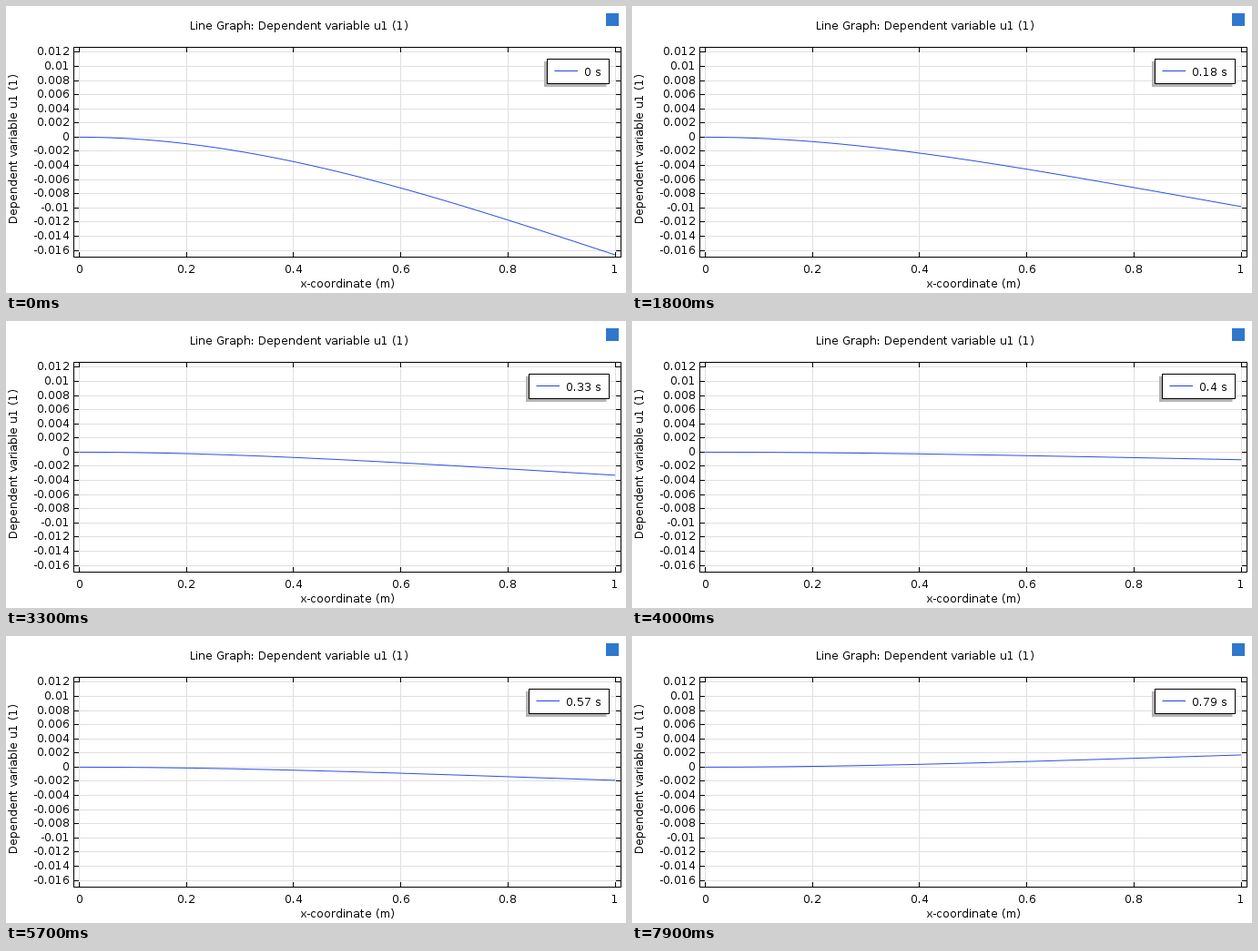
A matplotlib script that plays this animation: 681 by 316 pixels, repeating every 8 s.

```python
import numpy as np
import matplotlib.pyplot as plt
from matplotlib.animation import FuncAnimation
from matplotlib.patches import Rectangle

W, H, DPI = 681, 316, 64
PX = 72 / DPI                      # points per pixel
FRAMES, STEP_MS = 80, 100
BLUE = "#2a50ec"
GRID = "#e0e0e0"

# Unscaled hinting gives whole-pixel glyph advances
plt.rcParams.update({
    "font.family": "DejaVu Sans",
    "font.size": 12 * PX,
    "text.hinting": "native",
    "text.hinting_factor": 1,
    "text.kerning_factor": 6,
    "toolbar": "None",
})

fig = plt.figure(figsize=(W / DPI, H / DPI), dpi=DPI, facecolor="white")
ax = fig.add_axes([0, 0, 1, 1])
ax.set_xlim(0, W)
ax.set_ylim(H, 0)
ax.axis("off")

LEFT, RIGHT, TOP, BOTTOM = 74.5, 675.5, 45.5, 276.5


def px_x(x):
    return 80.5 + 588.5 * x


def px_y(u):
    return 144.4 - 7790 * u


def center(v):
    """Middle of the pixel that holds v."""
    return np.floor(v) + 0.5


def advance(text):
    """Pixel width of a number: narrow point and minus, wide digits."""
    return sum(4 if c in ".-" else 8 for c in text)


def line(xs, ys, color="black", z=2):
    return ax.plot(xs, ys, color=color, lw=PX, zorder=z, snap=False,
                   solid_capstyle="butt")[0]


def label(x, y, text, **kw):
    return ax.text(x, y, text, ha="left", va="baseline", **kw)


def box(x, y, w, h, face, edge="none", z=5):
    return ax.add_patch(Rectangle((x, y), w, h, fc=face, ec=edge, lw=PX,
                                  zorder=z, snap=False))


# Grid, ticks and tick labels
for k in range(6):
    x, text = px_x(k / 5), f"{k / 5:g}"
    c = center(x)
    line([c, c], [TOP, BOTTOM], GRID, 1)
    line([c, c], [TOP, TOP + 5.5])
    line([c, c], [BOTTOM - 5.5, BOTTOM])
    label(np.floor(x - advance(text) / 2 + 0.5), 294, text)
for k in range(-8, 7):
    u = round(k * 0.002, 3)
    c, text = center(px_y(u)), f"{u:g}"
    line([LEFT, RIGHT], [c, c], GRID, 1)
    line([LEFT, LEFT + 5.5], [c, c])
    line([RIGHT - 5.5, RIGHT], [c, c])
    label(70 - advance(text), c + 3.5, text)
box(LEFT, TOP, RIGHT - LEFT, BOTTOM - TOP, "none", "black", 3)

label(202, 26, "Line Graph: Dependent variable u1 (1)")
label(324, 310, "x-coordinate (m)")
label(13, 239, "Dependent variable u1 (1)", rotation=90, rotation_mode="anchor")
box(659, 8, 14, 14, "#2f78cc")

# Beam shapes, scaled to 1 at the tip
X = np.linspace(0, 1, 201)
STATIC = (3 * X**2 - X**3) / 2
B = 1.8751
MODE = (np.cosh(B * X) - np.cos(B * X) - 0.7341 * (np.sinh(B * X) - np.sin(B * X))) / 2


def swing(t):
    return -0.0153 * np.exp(-2.46 * t) * np.cos(np.pi * (11.15 * t - 0.02))


REST = -0.01664 * STATIC - swing(0) * MODE


def beam(t):
    return swing(t) * MODE + REST * np.exp(-60 * t)


curve = line(px_x(X), px_y(beam(0)), BLUE, 4)
shadow = box(0, 61, 1, 28, "#b4b4b4", z=6)
panel = box(0, 58.5, 1, 27, "white", "black", 7)
sample = line([0, 0], [71.5, 71.5], "#2244e0", 8)
caption = label(0, 77, "", zorder=8)


def draw(i):
    t = round(i * 0.01, 2)
    text = f"{t:g}"
    curve.set_ydata(px_y(beam(t)))

    # Legend is anchored on the right and grows with its digits
    left = 602.5 - advance(text)
    panel.set_x(left)
    panel.set_width(662.5 - left)
    shadow.set_x(left - 3.5)
    shadow.set_width(663 - left)
    sample.set_xdata([left + 8, left + 33.5])
    caption.set_x(left + 40.5)
    caption.set_text(text + " s")
    return curve, panel, shadow, sample, caption


anim = FuncAnimation(fig, draw, frames=FRAMES, init_func=lambda: draw(0),
                     interval=STEP_MS, repeat=True, repeat_delay=0, blit=False)
plt.show()
```
